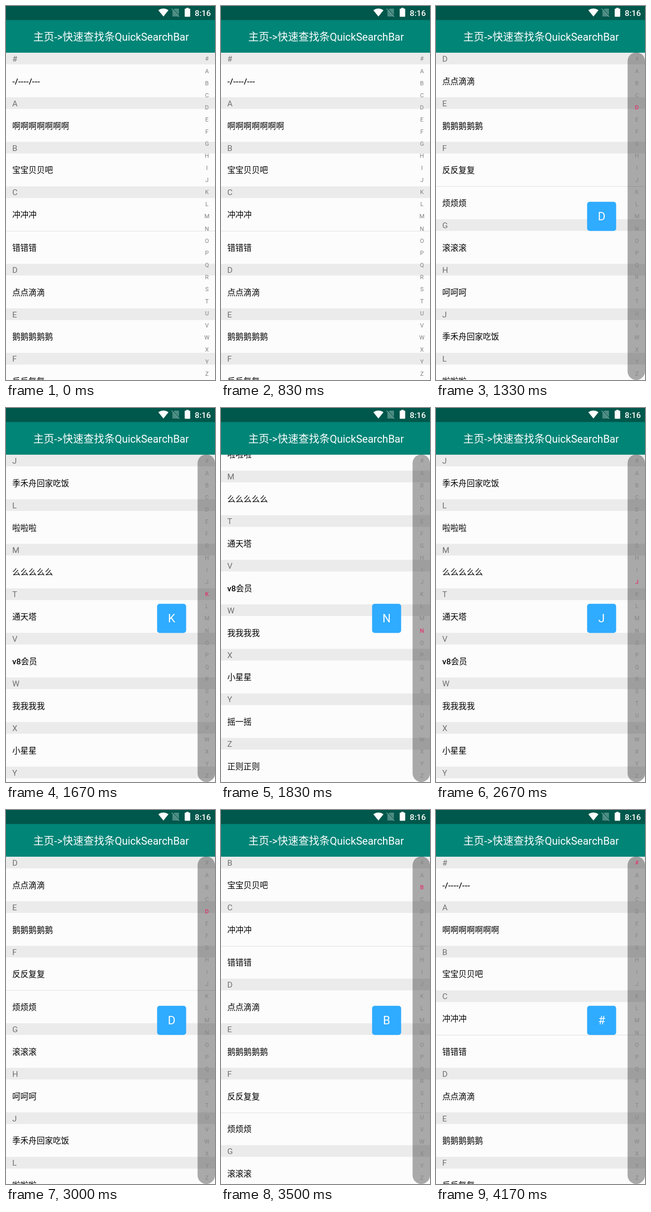
Write an HTML page with a canvas that moves like this. It is 400x712 px and loops after 4.34 s.

```html
<!DOCTYPE html>
<html lang="zh-CN">
<head>
<meta charset="utf-8">
<title>QuickSearchBar</title>
<style>
html, body { margin: 0; width: 100%; height: 100%; overflow: hidden; background: #fcfcfc; }
canvas { display: block; width: 400px; height: 712px; }
</style>
</head>
<body>
<canvas id="stage"></canvas>
<script>
const W = 400, H = 712, LOOP = 4340;
const DP = W / 360;
const STATUS_H = 24 * DP, TOP = 80 * DP;
const HEAD_H = 20 * DP, ROW_H = 56 * DP + .37;
const TEXT = 14 * DP;
const FONT = 'Roboto, "Noto Sans CJK SC", "Noto Sans CJK", sans-serif';
const LETTERS = '#ABCDEFGHIJKLMNOPQRSTUVWXYZ';
const STEP = (H - TOP) / LETTERS.length;

const sections = [
  ['#', '-/----/---'], ['A', '啊啊啊啊啊啊啊'], ['B', '宝宝贝贝吧'],
  ['C', '冲冲冲', '错错错'], ['D', '点点滴滴'], ['E', '鹅鹅鹅鹅鹅'],
  ['F', '反反复复', '烦烦烦'], ['G', '滚滚滚'], ['H', '呵呵呵'],
  ['J', '季禾舟回家吃饭'], ['L', '啦啦啦'], ['M', '么么么么么'],
  ['T', '通天塔'], ['V', 'v8会员'], ['W', '我我我我'],
  ['X', '小星星'], ['Y', '摇一摇'], ['Z', '正则正则']
];

// Letter under the finger from each time on
const touches = [
  [0, ''], [1330, 'D'], [1500, 'I'], [1670, 'K'], [1830, 'N'], [2000, 'P'],
  [2670, 'J'], [2830, 'H'], [3000, 'D'], [3170, 'C'], [3330, 'B'], [3670, '#']
];

let total = 0;
const offsets = sections.map(s => {
  const y = total;
  total += HEAD_H + (s.length - 1) * ROW_H;
  return y;
});
const maxScroll = total - (H - TOP) - 1;

const canvas = document.getElementById('stage');
const ctx = canvas.getContext('2d');
const dpr = window.devicePixelRatio || 1;
canvas.width = W * dpr;
canvas.height = H * dpr;
ctx.scale(dpr, dpr);

function rect(x, y, w, h, color) {
  ctx.fillStyle = color;
  ctx.fillRect(x, y, w, h);
}

function text(str, x, y, size, color, align = 'left', weight = 400) {
  ctx.font = `${weight} ${size}px ${FONT}`;
  ctx.textAlign = align;
  ctx.fillStyle = color;
  ctx.fillText(str, x, y);
}

function rounded(x, y, w, h, r, color) {
  ctx.fillStyle = color;
  ctx.beginPath();
  ctx.roundRect(x, y, w, h, r);
  ctx.fill();
}

function polygon(points, color) {
  ctx.fillStyle = color;
  ctx.beginPath();
  points.forEach(([x, y]) => ctx.lineTo(x, y));
  ctx.closePath();
  ctx.fill();
}

function scrollFor(letter) {
  if (!letter) return 0;
  let i = 0;
  while (i + 1 < sections.length && sections[i + 1][0] <= letter) i++;
  return Math.min(offsets[i], maxScroll);
}

function drawList(scroll) {
  sections.forEach(([key, ...rows], i) => {
    let y = TOP + offsets[i] - scroll;
    if (y > H || y + HEAD_H + rows.length * ROW_H < TOP) return;
    rect(0, y, W, HEAD_H, '#ebebeb');
    text(key, 12, y + 17, TEXT, '#707070');
    y += HEAD_H;
    rows.forEach((row, n) => {
      if (n) rect(0, Math.round(y), W, 1, '#e2e2e2');
      text(row, 12, y + 37.6, TEXT, '#000', 'left', 500);
      y += ROW_H;
    });
  });
}

function drawIndex(active) {
  if (active) rounded(W - 30 * DP, TOP - .5, 30 * DP, H - TOP + .5, 15 * DP, 'rgba(0,0,0,.33)');
  [...LETTERS].forEach((c, i) => {
    const on = c === active;
    const color = on ? '#e0356b' : active ? '#878787' : '#808080';
    text(c, 384.5, TOP + (i + .5) * STEP + 4, 10 * DP, color, 'center', on ? 500 : 400);
  });
}

function drawPopup(letter) {
  const size = 50 * DP;
  rounded(289.2, (TOP + H - size) / 2, size, size, 5, '#2fabff');
  text(letter, 317, 408.3, 20 * DP, '#fff', 'center');
}

function drawBars() {
  rect(0, 0, W, TOP, '#008577');
  rect(0, 0, W, STATUS_H, '#00574b');
  text('主页->快速查找条QuickSearchBar', 201.1, 65.5, 18 * DP, '#fff', 'center');

  // Wi-Fi
  ctx.fillStyle = '#fff';
  ctx.beginPath();
  ctx.moveTo(301.3, 20);
  ctx.lineTo(291.5, 8);
  ctx.quadraticCurveTo(301.3, 1.5, 311, 8);
  ctx.fill();
  // No SIM
  polygon([[322.5, 5], [331, 5], [331, 20], [318.5, 20], [318.5, 9]], '#4b8b82');
  ctx.lineWidth = 1.5;
  for (const [shift, color] of [[1.3, '#00574b'], [0, '#6aa098']]) {
    ctx.strokeStyle = color;
    ctx.beginPath();
    ctx.moveTo(317 + shift, 5);
    ctx.lineTo(331.5 + shift, 20.5);
    ctx.stroke();
  }
  // Battery
  rect(345, 3.5, 4.5, 3, '#fff');
  rounded(342, 5, 10.5, 15.5, 1, '#fff');
  text('8:16', 392, 18.5, TEXT, '#fff', 'right', 500);
}

function draw(t) {
  const letter = touches.filter(([at]) => at <= t).pop()[1];
  rect(0, 0, W, H, '#fcfcfc');
  drawList(scrollFor(letter));
  drawBars();
  drawIndex(letter);
  if (letter) drawPopup(letter);
}

const start = performance.now();
function tick() {
  draw((performance.now() - start) % LOOP);
  requestAnimationFrame(tick);
}
tick();
</script>
</body>
</html>
```
